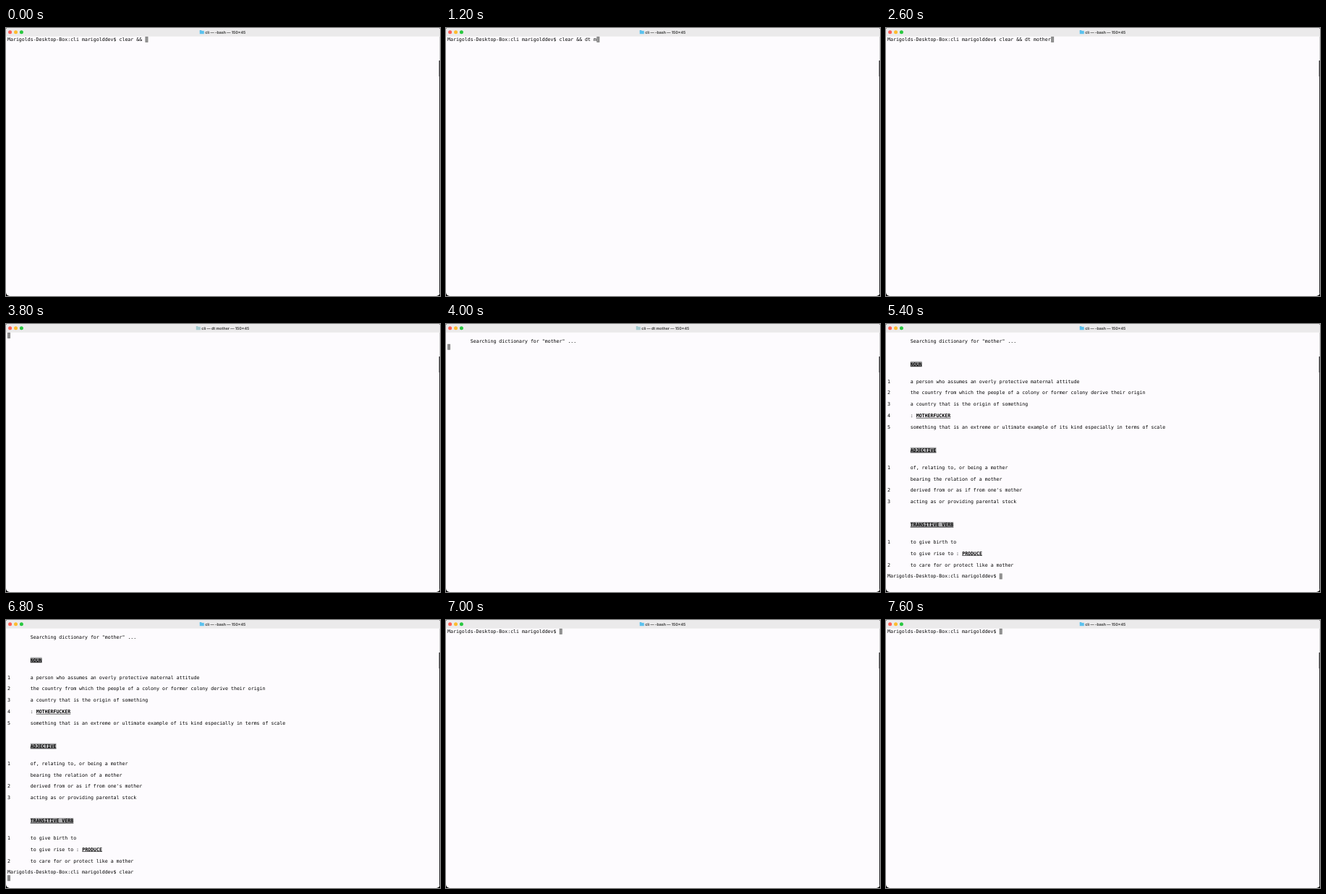
Recreate the animation shown at these times as an HTML page with a canvas. Size 600x371 px, loop 8000 ms.

```html
<!DOCTYPE html>
<html lang="en">
<head>
<meta charset="utf-8">
<title>Dictionary in a terminal</title>
<style>
  html, body { margin: 0; width: 100%; height: 100%; overflow: hidden; background: #fdfbfe; }
  canvas { display: block; width: 600px; height: 371px; }
</style>
</head>
<body>
<canvas id="stage" width="600" height="371"></canvas>
<script>
const ctx = document.getElementById("stage").getContext("2d");
const W = 600, H = 371, LOOP = 8000;
const LEFT = 2, TOP = 11.9, CELL = 3.968, ROW = 7.94, INDENT = 8;
const MONO = '6.59px "DejaVu Sans Mono", monospace';
const TITLE = '700 5.25px Inter, sans-serif';
const PROMPT = "Marigolds-Desktop-Box:cli marigolddev$ ";

// Typed text by start time
const COMMAND = [[0, ""], [400, "d"], [600, "dt"], [1000, "dt "], [1200, "dt m"], [1400, "dt mo"],
  [1600, "dt mot"], [1800, "dt moth"], [2000, "dt mothe"], [2200, "dt mother"]];
const CLEAR = [[0, ""], [6000, "c"], [6200, "cl"], [6400, "clea"], [6600, "clear"]];
const RUN = 3800, SEARCH = 4000, RESULT = 4400, ENTER = 6800, WIPE = 7000;

// Row, item number, text, linked word
const ENTRIES = [
  [8, "1", "a person who assumes an overly protective maternal attitude"],
  [10, "2", "the country from which the people of a colony or former colony derive their origin"],
  [12, "3", "a country that is the origin of something"],
  [14, "4", ": ", "MOTHERFUCKER"],
  [16, "5", "something that is an extreme or ultimate example of its kind especially in terms of scale"],
  [23, "1", "of, relating to, or being a mother"],
  [25, "", "bearing the relation of a mother"],
  [27, "2", "derived from or as if from one's mother"],
  [29, "3", "acting as or providing parental stock"],
  [36, "1", "to give birth to"],
  [38, "", "to give rise to : ", "PRODUCE"],
  [40, "2", "to care for or protect like a mother"]
];
const HEADINGS = [[5, "NOUN"], [20, "ADJECTIVE"], [33, "TRANSITIVE VERB"]];

const xOf = col => LEFT + col * CELL;
const yOf = row => TOP + row * ROW;
const latest = (steps, t) => steps.filter(s => s[0] <= t).pop()[1];

function rect(color, x, y, w, h) {
  ctx.fillStyle = color;
  ctx.fillRect(x, y, w, h);
}

function print(row, col, text, bold) {
  ctx.font = (bold ? "700 " : "400 ") + MONO;
  ctx.fillStyle = "#000";
  ctx.fillText(text, xOf(col), yOf(row) + 6.1);
}

function strong(row, col, text) {
  print(row, col, text, true);
  rect("#000", xOf(col), yOf(row) + 6.8, text.length * CELL, 0.6);
}

function cursor(row, col) {
  rect("#7c7c7c", xOf(col), yOf(row), CELL, ROW);
  rect("#929292", xOf(col) + 0.6, yOf(row) + 0.6, CELL - 1.2, ROW - 1.2);
}

function promptLine(row, typed, withCursor = true) {
  const line = PROMPT + typed;
  if (withCursor) cursor(row, line.length);
  print(row, 0, line);
}

function drawWindow() {
  rect("#000", 0, 0, W, H);
  ctx.beginPath();
  ctx.roundRect(0, 0, W, H, [2, 2, 5, 5]);
  ctx.clip();
  rect("#fdfbfe", 0, 0, W, H);
  rect("#d5d4d6", 599, 12, 1, 33);
  rect("#303032", 599, 45, 1, H);
  rect("#b0afb1", 598, 45, 1, 22);
}

function drawTitle(running) {
  rect("#ebeaeb", 0, 0, W, 11.7);
  ["#fe5f57", "#febc2e", "#28c840"].forEach((color, i) => {
    ctx.fillStyle = color;
    ctx.beginPath();
    ctx.arc(5.6 + i * 7.9, 5.7, 2.5, 0, 7);
    ctx.fill();
  });
  const title = `cli — ${running ? "dt mother" : "-bash"} — 150×45`;
  ctx.font = TITLE;
  const x = 299.5 - (ctx.measureText(title).width + 7.5) / 2;
  ctx.fillStyle = "#404040";
  ctx.fillText(title, x + 7.5, 7.6);
  rect(running ? "#8fbcc4" : "#42aee0", x, 3.2, 2.6, 1.2);
  rect(running ? "#a3cbd0" : "#5bc2ee", x, 3.9, 6, 4.3);
}

function drawResult() {
  for (const [row, text] of HEADINGS) {
    rect("#acacae", xOf(INDENT), yOf(row), text.length * CELL, ROW);
    strong(row, INDENT, text);
  }
  for (const [row, number, text, link] of ENTRIES) {
    print(row, 0, number);
    print(row, INDENT, text);
    if (link) strong(row, INDENT + text.length, link);
  }
}

function drawScreen(t) {
  if (t < RUN) return promptLine(0, "clear && " + latest(COMMAND, t));
  if (t >= WIPE) return promptLine(0, "");
  if (t < SEARCH) return cursor(0, 0);
  print(1, INDENT, 'Searching dictionary for "mother" ...');
  if (t < RESULT) return cursor(2, 0);
  drawResult();
  promptLine(42, latest(CLEAR, t), t < ENTER);
  if (t >= ENTER) cursor(43, 0);
}

function draw(t) {
  ctx.save();
  drawWindow();
  drawTitle(t >= RUN && t < RESULT);
  drawScreen(t);
  ctx.restore();
}

ctx.textRendering = "geometricPrecision";
const start = performance.now();
function tick() {
  draw((performance.now() - start) % LOOP);
  requestAnimationFrame(tick);
}
tick();
</script>
</body>
</html>
```
